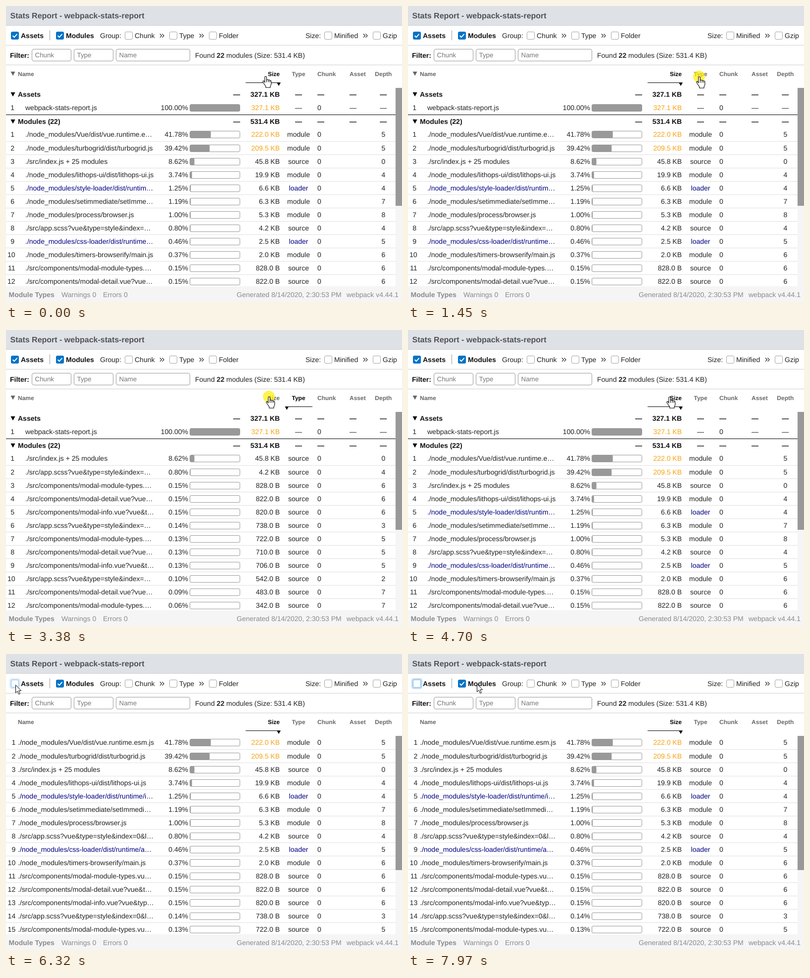
These frames come from a looping animation (800 px wide and 600 px high, 8000 ms). An HTML page:

```html
<!DOCTYPE html>
<html lang="en">
<head>
<meta charset="utf-8">
<title>Stats Report</title>
<style>
  html, body { margin: 0; width: 100%; height: 100%; overflow: hidden; background: #fff; }
  svg { display: block; width: 100vw; height: 100vh; }
  text { font-family: "Liberation Sans", Arial, sans-serif; font-size: 14px; fill: #222; text-rendering: geometricPrecision; white-space: pre; }
  .b { font-weight: bold; }
  .dark { fill: #111; }
  .title { font-size: 16px; font-weight: bold; fill: #505255; }
  .head { font-size: 12px; font-weight: bold; fill: #666; }
  .hint { font-size: 13.33px; fill: #757575; }
  .foot { fill: #8a8a8a; }
  .big { fill: #f5a312; }
  .loader { fill: #000080; }
</style>
</head>
<body>
<svg id="stage" viewBox="0 0 800 600"></svg>
<script>
const NS = 'http://www.w3.org/2000/svg';
const LOOP = 8000;
const stage = document.getElementById('stage');

function add(parent, tag, attrs, text) {
  const node = document.createElementNS(NS, tag);
  for (const key in attrs) node.setAttribute(key, attrs[key]);
  if (text !== undefined) node.textContent = text;
  parent.appendChild(node);
  return node;
}
const group = parent => add(parent, 'g', {});
const rect = (p, x, y, width, height, fill, more) => add(p, 'rect', { x, y, width, height, fill, ...more });
const path = (p, d, fill, more) => add(p, 'path', { d, fill, ...more });
const label = (p, x, y, text, cls = '', anchor = 'start') =>
  add(p, 'text', { x, y, class: cls, 'text-anchor': anchor }, text);
const arrowDown = (p, x, y, w, h, fill) => path(p, `M${x} ${y}h${w}l${-w / 2} ${h}z`, fill);
const show = (node, on) => node.setAttribute('display', on ? 'inline' : 'none');

// Shorten a name so that it ends before the name column does
const pen = document.createElement('canvas').getContext('2d');
pen.font = '1000px "Liberation Sans", Arial, sans-serif';
function fit(text, x, right = 300) {
  const wide = s => x + pen.measureText(s).width * 0.014 > right;
  if (!wide(text)) return text;
  while (wide(text + '…')) text = text.slice(0, -1);
  return text + '…';
}

// ---- Data, largest module first ----
const npm = './node_modules/';
const scss = './src/app.scss?vue&type=style&index=0&lang=scss';
const modal = name => `./src/components/modal-${name}.vue?vue&type=template`;
const modules = [
  [npm + 'Vue/dist/vue.runtime.esm.js', 41.78, '222.0 KB', 'module', 5],
  [npm + 'turbogrid/dist/turbogrid.js', 39.42, '209.5 KB', 'module', 5],
  ['./src/index.js + 25 modules', 8.62, '45.8 KB', 'source', 0],
  [npm + 'lithops-ui/dist/lithops-ui.js', 3.74, '19.9 KB', 'module', 4],
  [npm + 'style-loader/dist/runtime/injectStyles.js', 1.25, '6.6 KB', 'loader', 4],
  [npm + 'setimmediate/setImmediate.js', 1.19, '6.3 KB', 'module', 7],
  [npm + 'process/browser.js', 1, '5.3 KB', 'module', 8],
  [scss, 0.8, '4.2 KB', 'source', 4],
  [npm + 'css-loader/dist/runtime/api.js', 0.46, '2.5 KB', 'loader', 5],
  [npm + 'timers-browserify/main.js', 0.37, '2.0 KB', 'module', 6],
  [modal('module-types'), 0.15, '828.0 B', 'source', 6],
  [modal('detail'), 0.15, '822.0 B', 'source', 6],
  [modal('info'), 0.15, '820.0 B', 'source', 6],
  [scss, 0.14, '738.0 B', 'source', 3],
  [modal('module-types'), 0.13, '722.0 B', 'source', 5],
  [modal('detail'), 0.13, '710.0 B', 'source', 5],
  [modal('info'), 0.13, '706.0 B', 'source', 5],
  [scss, 0.1, '542.0 B', 'source', 2],
  [modal('detail'), 0.09, '483.0 B', 'source', 7],
  [modal('module-types'), 0.06, '342.0 B', 'source', 7]
];
const sources = modules.filter(m => m[3] === 'source');

// ---- Page frame ----
rect(stage, 0, 0, 800, 600, '#fff');
rect(stage, 0, 0, 800, 39, '#dee1e6');
for (const y of [39, 79, 119]) rect(stage, 0, y, 800, 1, '#d0d0d0');
label(stage, 8.5, 25, 'Stats Report - webpack-stats-report', 'title');

function checkbox(x, checked) {
  const g = group(stage);
  if (checked) {
    rect(g, x, 52, 16, 16, '#0073c6', { rx: 3 });
    path(g, `M${x + 3.6} 60.2l3.1 3.1 5.8-6.4`, 'none', { stroke: '#fff', 'stroke-width': 2 });
  } else {
    rect(g, x + 0.5, 52.5, 15, 15, '#fff', { rx: 2.5, stroke: '#a5a5a5' });
  }
  return g;
}
const assetsOn = checkbox(10, true);
const assetsOff = group(stage);
const ring = rect(assetsOff, 7, 49, 22, 22, '#bfdcf5', { rx: 5 });
rect(assetsOff, 10.5, 52.5, 15, 15, '#fff', { rx: 2.5, stroke: '#80bdf0' });
checkbox(101, true);
label(stage, 30, 65, 'Assets', 'b dark');
label(stage, 121, 65, 'Modules', 'b dark');
path(stage, 'M88.5 50V70', 'none', { stroke: '#333', 'stroke-dasharray': '1 1' });

label(stage, 190, 65, 'Group:');
label(stage, 605, 65, 'Size:');
[[240, 'Chunk'], [330, 'Type'], [410, 'Folder'], [643, 'Minified'], [741, 'Gzip']].forEach(([x, text]) => {
  checkbox(x, false);
  label(stage, x + 20, 65, text);
});
for (const x of [311, 391, 722])
  path(stage, `M${x} 56.5l3.5 3.7-3.5 3.7m4.5-7.4l3.5 3.7-3.5 3.7`, 'none', { stroke: '#222', 'stroke-width': 1.2 });

label(stage, 8, 104.5, 'Filter:', 'b dark');
[[52, 80, 'Chunk'], [137, 80, 'Type'], [222, 150, 'Name']].forEach(([x, w, text]) => {
  rect(stage, x + 0.5, 87.5, w - 1, 24, '#fff', { rx: 3.5, stroke: '#999' });
  label(stage, x + 6.5, 104, text, 'hint');
});
const found = label(stage, 382, 105, 'Found ');
add(found, 'tspan', { class: 'b' }, '22');
add(found, 'tspan', {}, ' modules (Size: 531.4 KB)');

// ---- Column heads ----
const nameArrow = arrowDown(stage, 9.5, 133, 9, 8.5, '#666');
label(stage, 24, 142, 'Name', 'head');
const sizeHead = label(stage, 553, 142, 'Size', 'head', 'end');
const typeHead = label(stage, 591, 142, 'Type', 'head', 'middle');
label(stage, 629, 142, 'Chunk', 'head');
label(stage, 694, 142, 'Asset', 'head');
label(stage, 762.3, 142, 'Depth', 'head', 'middle');
const sizeMark = group(stage);
rect(sizeMark, 484, 155, 70, 1, '#000');
arrowDown(sizeMark, 547, 155, 8, 7, '#000');
const typeMark = group(stage);
rect(typeMark, 564, 155, 55, 1, '#000');
arrowDown(typeMark, 563.5, 155, 7.5, 7, '#000');

// ---- Grid ----
add(add(add(stage, 'defs', {}), 'clipPath', { id: 'body' }), 'rect', { x: 0, y: 166, width: 800, height: 402 });
const grid = add(stage, 'g', { 'clip-path': 'url(#body)' });
const rowTop = i => 166 + 27 * i;

function dashes(g, y, cls, columns) {
  const at = { bar: [473, 'end'], type: [591, 'middle'], chunk: [629, 'start'], asset: [694, 'start'], depth: [762.3, 'middle'] };
  for (const c of columns) label(g, at[c][0], y, '—', cls, at[c][1]);
}

function groupRow(g, i, text, size) {
  const top = rowTop(i), base = top + (i ? 19 : 18);
  if (i) rect(g, 0, top, 787, 1, '#000');
  arrowDown(g, 9.5, base - 9, 9, 8.5, '#000');
  label(g, 24, base, text, 'b dark');
  label(g, 553, base, size, 'b dark', 'end');
  dashes(g, base, 'b dark', ['bar', 'type', 'chunk', 'asset', 'depth']);
}

// The first row of a group has no top border and sits one pixel higher
function itemRow(g, i, n, [name, pct, size, type, depth], flat) {
  const top = rowTop(i), edge = n > 1 ? 1 : 0, base = top + 18 + edge;
  const x = flat ? 24 : 39, kind = type === 'loader' ? 'loader' : '';
  if (edge) rect(g, 0, top, 787, 1, '#e0e0e0');
  label(g, flat ? 19.2 : n > 9 ? 18.6 : 17, base, n, '', 'end');
  label(g, x, base, fit(name, x), kind);
  label(g, 368, base, pct.toFixed(2) + '%', '', 'end');
  const y = top + 6 + edge;
  rect(g, 371.5, y + 0.5, 101, 14, '#fff', { rx: 2.5, stroke: '#999' });
  rect(g, 372, y + 1, pct, 13, '#999', { rx: Math.min(1.5, pct / 2) });
  label(g, 553, base, size, /KB/.test(size) && parseFloat(size) > 200 ? 'big' : '', 'end');
  label(g, 629, base, '0');
  if (type) {
    label(g, 591, base, type, kind, 'middle');
    label(g, 762.3, base, depth, '', 'middle');
  } else {
    dashes(g, base, '', ['type', 'asset', 'depth']);
  }
}

function view(list, flat) {
  const g = group(grid);
  let i = 0;
  if (!flat) {
    groupRow(g, 0, 'Assets', '327.1 KB');
    itemRow(g, 1, 1, ['webpack-stats-report.js', 100, '327.1 KB']);
    groupRow(g, 2, 'Modules (22)', '531.4 KB');
    i = 3;
  }
  list.slice(0, 15 - i).forEach((m, n) => itemRow(g, i + n, n + 1, m, flat));
  return g;
}
const bySize = view(modules, false);
const byType = view(sources, false);
const flatList = view(modules, true);

rect(stage, 787, 166, 13, 402, '#f5f5f5');
const thumb = rect(stage, 787, 166, 13, 239, '#999');

// ---- Footer ----
rect(stage, 0, 568, 800, 32, '#f5f5f5');
label(stage, 5.5, 590, 'Module Types', 'foot b');
label(stage, 112, 590, 'Warnings 0', 'foot');
label(stage, 196, 590, 'Errors 0', 'foot');
label(stage, 466, 590, 'Generated 8/14/2020, 2:30:53 PM', 'foot');
label(stage, 688, 590, 'webpack v4.44.1', 'foot');

// ---- Pointer ----
const spot = add(stage, 'circle', { r: 12, fill: '#fff000', opacity: 0.7 });
const line = { stroke: '#000', 'stroke-width': 1.1, 'stroke-linejoin': 'round' };
const hand = group(stage);
path(hand, 'M-1.2 13V1.8Q-1.2.5.6.5T2.4 1.8V8Q2.6 7 4.2 7T6 8.4Q6.3 7.6 7.7 7.7T9.2 9.2Q9.5 8.6 10.7 9T11.8 11V16Q11.8 18 10 20.5V23.3H.7V20.5Q-1 18.5-2.5 16L-5 12.2Q-5.7 10.8-4.5 10.1T-2.3 11Z', '#fff', line);
path(hand, 'M2.4 8V12.5M6 8.6V12.5M9.2 9.5V12.5', 'none', line);
const arrow = path(stage, 'M.5.8V16.8L4.1 13.4 6.8 19.6 9.4 18.5 6.7 12.4H11.6Z', '#fff', { ...line, 'stroke-width': 1 });

const cubic = p => p < 0.5 ? 4 * p ** 3 : 1 - 4 * (1 - p) ** 3;
const early = p => cubic(p * 0.7) / cubic(0.7);
const quartOut = p => 1 - (1 - p) ** 4;
const linear = p => p;
// start, end, steps, from, to, easing for x and y
const moves = [
  [500, 1130, 9, [524, 142], [586, 143], cubic, cubic],
  [1280, 1280, 1, [586, 143], [588, 143], linear, linear],
  [2690, 3140, 7, [588, 143], [532, 132], cubic, cubic],
  [3290, 3290, 1, [532, 132], [531, 135], linear, linear],
  [4700, 5490, 11, [529, 135], [76, 79], early, early],
  [5550, 5870, 5, [76, 79], [19, 63], quartOut, linear],
  [6170, 6170, 1, [19, 63], [19, 62], linear, linear],
  [7640, 7970, 5, [19, 62], [139, 60], cubic, cubic]
];

function pointer(t) {
  let at = moves[0][3];
  for (const [t0, t1, n, a, b, ex, ey] of moves) {
    if (t < t0) break;
    const step = n > 1 ? Math.floor((t - t0) / (t1 - t0) * (n - 1) + 0.01) + 1 : 1;
    const p = Math.min(1, step / n);
    at = [a[0] + (b[0] - a[0]) * ex(p), a[1] + (b[1] - a[1]) * ey(p)].map(Math.round);
  }
  return at;
}

const within = (t, a, b) => t >= a && t < b;

function draw(t) {
  const typed = within(t, 1610, 3530), flat = t >= 6320;
  show(bySize, !typed && !flat);
  show(byType, typed);
  show(flatList, flat);
  show(nameArrow, !flat);
  show(sizeMark, !typed);
  show(typeMark, typed);
  sizeHead.style.fill = typed ? '' : '#000';
  typeHead.style.fill = typed ? '#000' : '';
  show(assetsOn, !flat);
  show(assetsOff, flat);
  ring.setAttribute('opacity', t < 6410 ? 0.5 : 1);
  thumb.setAttribute('height', flat ? 272 : 239);

  const [x, y] = pointer(t), move = `translate(${x} ${y})`;
  for (const node of [spot, hand, arrow]) node.setAttribute('transform', move);
  show(spot, within(t, 1450, 1610) || within(t, 3380, 3530) || within(t, 6170, 6320));
  show(hand, y >= 120);
  show(arrow, y < 120);
}

const start = performance.now();
function tick(now) {
  draw(Math.max(0, now - start) % LOOP);
  requestAnimationFrame(tick);
}
draw(0);
requestAnimationFrame(tick);
</script>
</body>
</html>
```
